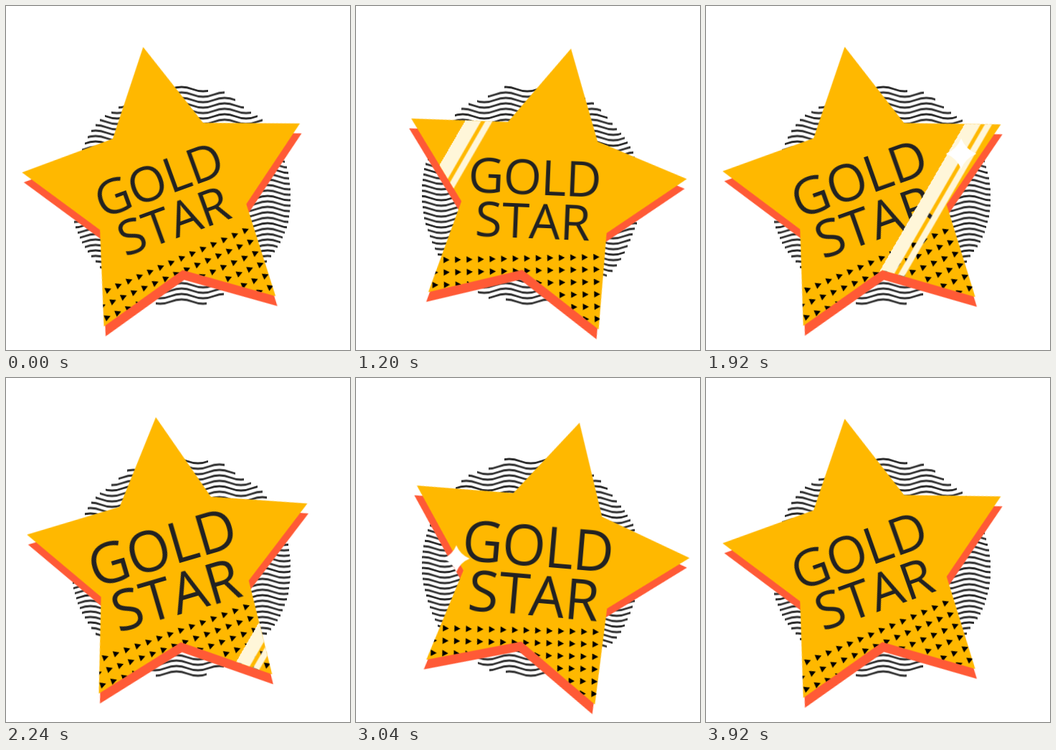
Recreate the animation shown at these times as an HTML page. Size 480x480 px, loop 4000 ms.

```html
<!DOCTYPE html>
<html lang="en">
<head>
<meta charset="utf-8">
<title>Gold star</title>
<style>
  html, body { margin: 0; width: 100%; height: 100%; overflow: hidden; background: #fff; }
  #stage { display: block; width: 100vw; height: 100vh; }
  :root { --ease: cubic-bezier(.333, 0, .667, 1); }

  .wave { fill: none; stroke: #2d2d2d; stroke-width: 2.8; animation: drift 2s linear infinite; }
  .swing, .level { transform-origin: 240px 333px; }
  .swing { animation: swing 1s var(--ease) infinite alternate; }
  .level { animation: level 1s var(--ease) infinite alternate; }
  .pulse { animation: pulse .2s var(--ease) infinite alternate; }
  .shine { fill: #fff6d9; animation: shine 4s linear infinite; }
  .spark { fill: #fff; animation: spark 4s linear infinite; }
  text {
    font: 74px "Open Sans", "Noto Sans", sans-serif;
    font-kerning: none;
    fill: #222;
    text-anchor: middle;
  }

  @keyframes drift { to { transform: translateX(-60px); } }
  @keyframes swing { from { transform: rotate(-10deg); } to { transform: rotate(15deg); } }
  @keyframes level { from { transform: rotate(10deg); } to { transform: rotate(-15deg); } }
  @keyframes pulse { from { transform: scale(.926); } to { transform: scale(1.07); } }
  @keyframes shine {
    0%, 17.5% { transform: translateX(2px); }
    62.5%, 100% { transform: translateX(530px); }
  }
  @keyframes spark {
    0%, 8% { transform: scale(0); }
    25% { transform: scale(1); }
    29.5%, 100% { transform: scale(0); }
  }
</style>
</head>
<body>
<svg id="stage" viewBox="0 0 480 480">
  <defs>
    <polygon id="star"/>
    <clipPath id="inside"><use href="#star"/></clipPath>
    <path id="glint" d="M0-24Q7-7 24 0Q7 7 0 24Q-7 7-24 0Q-7-7 0-24Z"/>
  </defs>
  <g id="disc"></g>
  <g class="swing">
    <use href="#star" y="14" fill="#ff5a36"/>
    <use href="#star" fill="#ffb800"/>
    <g clip-path="url(#inside)">
      <path id="dots" transform="translate(337 329.4) rotate(-13.5)"/>
    </g>
    <g transform="translate(234.5 270.5) rotate(-10)">
      <g class="pulse">
        <text y="-8" letter-spacing="-1">GOLD</text>
        <text y="57.5">STAR</text>
      </g>
    </g>
    <g clip-path="url(#inside)">
      <g class="level">
        <g class="shine">
          <g transform="translate(0 166) skewX(-30)">
            <rect y="-170" width="22.5" height="500"/>
            <rect x="28.5" y="-170" width="10" height="500"/>
          </g>
        </g>
      </g>
    </g>
  </g>
  <g id="sparks"></g>
</svg>
<script>
  const $ = id => document.getElementById(id);
  const range = n => [...Array(n).keys()];

  // Five-pointed star around (240, 260)
  $('star').setAttribute('points', range(10).map(i => {
    const r = i % 2 ? 109 : 207, a = i * Math.PI / 5;
    return [240 + r * Math.sin(a), 260 - r * Math.cos(a)].map(v => v.toFixed(2));
  }).join(' '));

  // Triangle grid, filling leftwards and down
  $('dots').setAttribute('d', range(19 * 8).map(n => {
    const x = -16.1 * (n % 19), y = 17.3 * Math.floor(n / 19);
    return `M${x - 4.2} ${y - 4.5}l8.4 4.5l-8.4 4.5z`;
  }).join(''));

  // Disc of wavy lines, each cut to its chord
  const wave = 'M50 0q15-6 30 0' + 't30 0'.repeat(13);
  $('disc').innerHTML = range(40).map(i => {
    const y = 116 + 7.6 * i, half = Math.sqrt(152.5 ** 2 - (y - 264) ** 2);
    const left = 244.5 - half, width = 2 * half;
    return `<svg x="${left}" y="${y - 8}" width="${width}" height="16"
      viewBox="${left} -8 ${width} 16"><path class="wave" d="${wave}"/></svg>`;
  }).join('');

  $('sparks').innerHTML = [[257, 214, 0], [356, 206, -3], [140, 252, -2]].map(([x, y, delay]) =>
    `<g transform="translate(${x} ${y})">
      <use class="spark" href="#glint" style="animation-delay:${delay}s"/></g>`
  ).join('');
</script>
</body>
</html>
```
